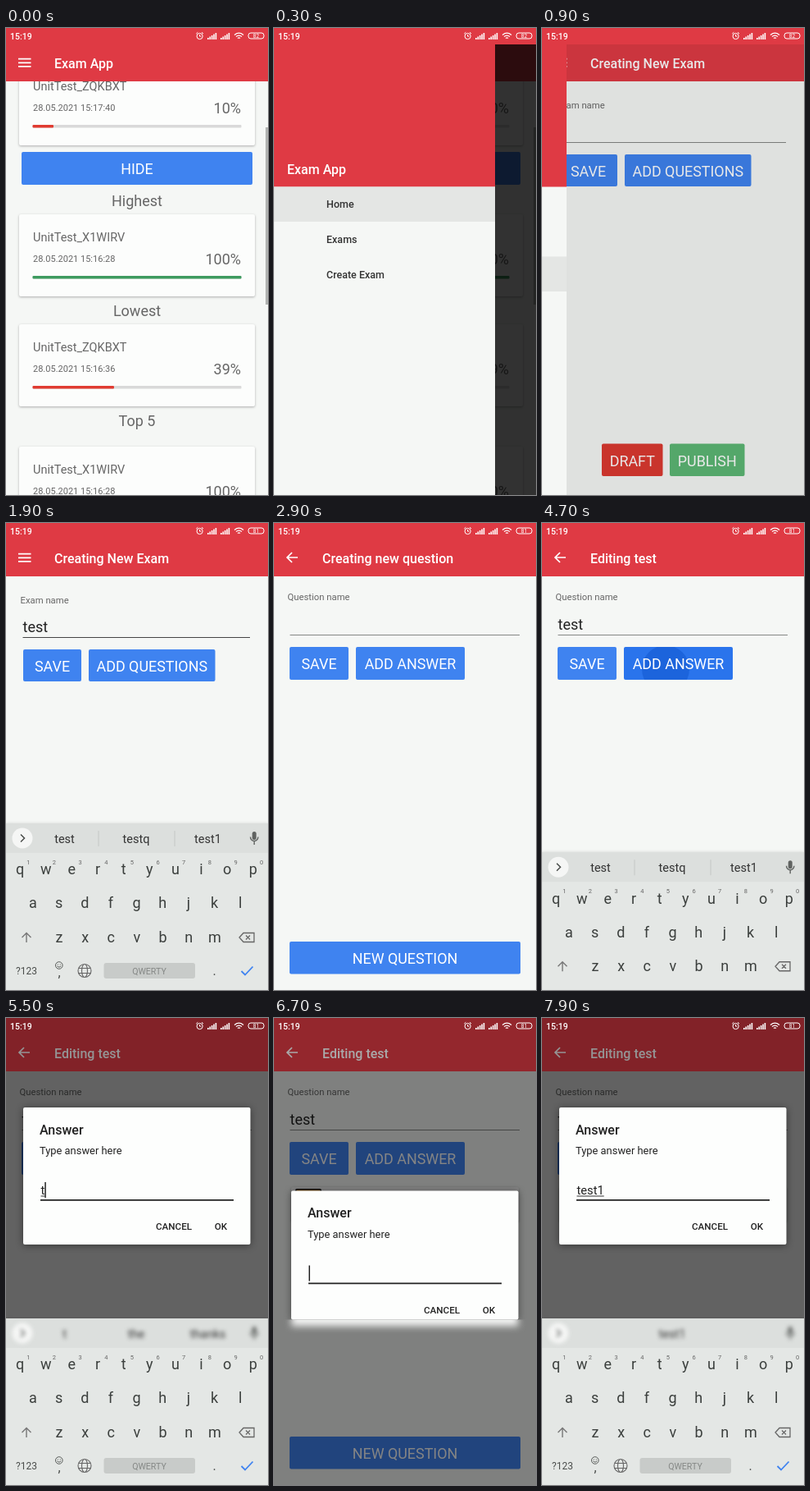
Write an HTML page with a canvas that moves like this. It is 320 px wide and 569 px high and loops after 8000 ms.

```html
<!DOCTYPE html>
<html lang="en">
<head>
<meta charset="utf-8">
<title>Exam App</title>
<style>
  html, body { margin: 0; width: 100%; height: 100%; overflow: hidden; background: #f5f7f5; }
  canvas { display: block; }
</style>
</head>
<body>
<canvas id="stage" width="320" height="569"></canvas>
<script>
const ctx = document.getElementById('stage').getContext('2d');
const W = 320, H = 569, LOOP = 8000;
const RED = '#df3a44', BLUE = '#3f83f0', PRESSED = '#1f6be9', PAPER = '#f5f7f5', GREY = '#666';
const KEYBOARD_SPANS = [[1150, 2000], [3050, 4600], [5000, 6300], [6750, 9000]];
const DIALOG_SPANS = [[4800, 6400], [6600, 9000]];
const HINTS = {
  t: ['t', 'the', 'thanks'], te: ['te', 'the', 'test'], tes: ['tes', 'test', 'yes'],
  test: ['test', 'testq', 'test1'], test1: ['', 'test1', '']
};

const clamp = v => Math.max(0, Math.min(1, v));
const easeOut = p => 1 - (1 - p) ** 2;
const within = (t, a, b) => t >= a && t < b;
const typed = (word, t, start, step = 150) =>
  word.slice(0, Math.max(0, Math.floor((t - start) / step) + 1));

function rect(x, y, w, h, color, radius = 0) {
  ctx.fillStyle = color;
  ctx.beginPath();
  ctx.roundRect(x, y, w, h, radius);
  ctx.fill();
}

function circle(x, y, r, color) {
  ctx.fillStyle = color;
  ctx.beginPath();
  ctx.arc(x, y, r, 0, 7);
  ctx.fill();
}

function stroke(path, color, width = 1) {
  ctx.strokeStyle = color;
  ctx.lineWidth = width;
  ctx.stroke(new Path2D(path));
}

// y is the middle of the capital letters
function text(str, x, y, size, color, align = 'left', weight = 400) {
  ctx.font = `${weight} ${size}px Roboto, sans-serif`;
  ctx.textAlign = align;
  ctx.fillStyle = color;
  ctx.fillText(str, x, y + size * 0.355);
  return ctx.measureText(str).width;
}

function shadowed(draw, blur = 3, alpha = 0.3) {
  ctx.save();
  ctx.shadowColor = `rgba(0,0,0,${alpha})`;
  ctx.shadowBlur = blur;
  ctx.shadowOffsetY = 1;
  draw();
  ctx.restore();
}

function button(label, x, y, w, h, color = BLUE) {
  rect(x, y, w, h, color, 2);
  text(label, x + w / 2, y + h / 2 + 1, 17.9, '#fff', 'center');
}

function statusBar(t) {
  const white = '#fff';
  text('15:19', 5, 10, 10.5, white, 'left', 500);
  stroke('M233 10a3.6 3.6 0 1 0 7.2 0a3.6 3.6 0 1 0-7.2 0M236.6 8v2.2h1.6M232.3 7l2-1.8M241 7l-2-1.8', white);
  for (const x of [246, 262])
    for (let i = 0; i < 5; i++) rect(x + i * 2.4, 12 - i * 1.5, 1.6, 2 + i * 1.5, white);
  stroke('M279 8.5q5.5-4.6 11 0M281 10.6q3.5-2.8 7 0M283 12.4q1.5-1.2 3 0', white, 1.3);
  stroke('M299 6h13a3 3 0 0 1 3 3v1a3 3 0 0 1-3 3h-13a3 3 0 0 1-3-3v-1a3 3 0 0 1 3-3z', white);
  text(t < 1900 ? '82' : '81', 305.5, 9.7, 6.5, white, 'center');
}

function appBar(title, back) {
  rect(0, 0, W, 65, RED);
  stroke(back ? 'M29 42H16.5M22 36l-6 6l6 6' : 'M15 37.7h15.5M15 42.3h15.5M15 46.9h15.5', '#fff', 1.7);
  text(title, 59, 43.5, 16, '#fff', 'left', 500);
}

function resultCard(name, date, percent, y) {
  shadowed(() => rect(16, y, 288, 100, '#fcfdfc', 2));
  text(name, 33, y + 28, 14.5, GREY);
  text(date, 33, y + 54, 11, GREY);
  text(percent + '%', 287, y + 55, 18, GREY, 'right');
  rect(32.5, y + 75, 255, 3.5, '#d9d9d9', 1);
  rect(32.5, y + 75, 2.55 * percent, 3.5, percent < 50 ? '#e03b31' : '#3d9b5f', 1);
}

function resultsPage() {
  resultCard('UnitTest_ZQKBXT', '28.05.2021 15:17:40', 10, 43);
  button('HIDE', 19, 151, 282, 40);
  text('Highest', 160, 211, 18, GREY, 'center');
  resultCard('UnitTest_X1WIRV', '28.05.2021 15:16:28', 100, 227);
  text('Lowest', 160, 345, 18, GREY, 'center');
  resultCard('UnitTest_ZQKBXT', '28.05.2021 15:16:36', 39, 361);
  text('Top 5', 160, 479, 18, GREY, 'center');
  resultCard('UnitTest_X1WIRV', '28.05.2021 15:16:28', 100, 510);
  rect(317, 121, 3, 216, '#b1b3b1');
  appBar('Exam App');
}

function field(label, value, x, labelY, lineY, right, focused, t) {
  text(label, x, labelY, 11.3, GREY);
  const width = text(value, x + 3, lineY - 13, 18, '#222');
  rect(x + 3, lineY - 0.5, right - x - 3, 1, focused ? '#444' : '#858785');
  if (focused && t % 1000 < 800) rect(x + 4 + width, lineY - 23, 1.3, 19, '#222');
}

function examPage(t) {
  appBar(t < 2100 ? 'Creating New Exam' : 'Editing test');
  field('Exam name', typed('test', t, 1400), 17.5, 94, 139.5, 298, within(t, 1150, 2000), t);
  button('SAVE', 21, 154, 71, 39, within(t, 1950, 2150) ? PRESSED : BLUE);
  button('ADD QUESTIONS', 101, 154, 154.5, 39, t >= 2350 ? PRESSED : BLUE);
  button('DRAFT', 73, 506.5, 74.5, 39.5, '#dd3930');
  button('PUBLISH', 156, 506.5, 91.5, 39.5, '#5cb874');
}

function questionPage(t) {
  appBar(t < 4300 ? 'Creating new question' : 'Editing test', true);
  field('Question name', typed('test', t, 3500), 16.5, 90, 136.5, 300, within(t, 3050, 4200), t);
  button('SAVE', 19, 151, 72, 40, within(t, 4150, 4350) ? PRESSED : BLUE);
  const tapped = within(t, 4600, 4900) || within(t, 6500, 6700);
  rect(100, 151, 133, 40, tapped ? '#2a74ec' : BLUE, 2);
  if (tapped) {
    ctx.save();
    ctx.beginPath();
    ctx.rect(100, 151, 133, 40);
    ctx.clip();
    circle(151, 178, 29, '#1c64dc');
    ctx.restore();
  }
  text('ADD ANSWER', 166.5, 172, 17.9, '#fff', 'center');
  if (t >= 6400) {
    shadowed(() => rect(21, 206, 278, 42, '#fcfdfc', 2));
    rect(26, 208, 32, 32, '#222', 2);
    rect(27.5, 209.5, 29, 29, '#f0a030', 1);
    text('test', 68, 226, 14.5, GREY);
  }
  button('NEW QUESTION', 19, 510, 282, 39.5);
}

function drawer(t) {
  const open = t < 700 ? easeOut(clamp(t / 300)) : 1 - easeOut(clamp((t - 700) / 300));
  if (!open) return;
  rect(0, 20, W, H, `rgba(0,0,0,${0.8 * open})`);
  ctx.save();
  ctx.translate(270 * (open - 1), 0);
  rect(0, 0, 270, H, PAPER);
  rect(0, 0, 270, 193.5, RED);
  text('Exam App', 16, 172, 16, '#fff', 'left', 500);
  rect(0, t < 600 ? 193.5 : 278.5, 270, 42.5, '#e4e6e4');
  ['Home', 'Exams', 'Create Exam'].forEach((item, i) =>
    text(item, 64, 215 + i * 42.6, 12.5, '#333', 'left', 500));
  ctx.restore();
}

function dialog(t, keyboard) {
  const span = DIALOG_SPANS.find(([a, b]) => within(t, a, b));
  if (!span) return;
  const shown = easeOut(clamp((t - span[0]) / 180));
  rect(0, 0, W, 65, `rgba(0,0,0,${0.42 * shown})`);
  rect(0, 65, W, H, `rgba(0,0,0,${0.6 * shown})`);
  const value = t < 6500 ? typed('test', t, 5500) : typed('test1', t, 7100);
  const risen = keyboard > 0;
  ctx.save();
  ctx.globalAlpha = clamp(shown * 2);
  ctx.translate(0, 101.5 * (1 - keyboard));
  shadowed(() => rect(21, 109, 277.5, risen ? 167 : 157, '#fdfefd', 2), 10, 0.45);
  if (!risen) {
    ctx.save();
    ctx.beginPath();
    ctx.rect(0, 266, W, 30);
    ctx.clip();
    ctx.filter = 'blur(4px)';
    rect(21, 250, 277.5, 24, '#f4f5f4');
    ctx.restore();
  }
  text('Answer', 41, 136, 16, '#222', 'left', 500);
  text('Type answer here', 41, 161.5, 12.9, '#222');
  const width = text(value, 42.5, 210, 14.7, '#222');
  if (value) rect(42.5, 216.5, width, 1, '#333');
  if (t % 1000 < 800) rect(42.5 + width, 200, 1.5, 19, '#222');
  rect(42, 221, 236, 1.7, '#222');
  text('CANCEL', 205, 254, 11.6, '#222', 'center', 500);
  text('OK', 262.5, 254, 11.6, '#222', 'center', 500);
  ctx.restore();
  return { value };
}

function keyRow(keys, x, y) {
  [...keys].forEach((key, i) => text(key, x + i * 31.65, y, 18, '#3b3f3d', 'center'));
}

function drawKeyboard(amount, word, blurred) {
  if (!amount) return;
  const ink = '#4a4d4b';
  ctx.save();
  ctx.translate(0, H - 203 * amount);
  shadowed(() => rect(0, 0, W, 203, '#e4e7e5'), 4, 0.25);
  rect(0, 0, W, 36, '#dcdfdd');
  ctx.save();
  if (blurred) ctx.filter = 'blur(2.5px)';
  circle(20, 18, 12.5, '#f5f6f5');
  stroke('M18 13.5l4.5 4.5l-4.5 4.5', ink, 1.5);
  (HINTS[word] || []).forEach((hint, i) => text(hint, 71.5 + i * 87.5, 18.5, 14.5, '#333', 'center'));
  if (!blurred) stroke('M113 9v19M206 9v19', '#c4c7c5');
  rect(300.7, 10, 5, 10, '#606361', 2.5);
  stroke('M298.5 16.5a4.7 5 0 0 0 9.4 0M303.2 22v4', '#606361', 1.4);
  ctx.restore();

  keyRow('qwertyuiop', 17, 56);
  [...'1234567890'].forEach((n, i) => text(n, 27.3 + i * 31.65, 47, 7.5, '#666', 'center'));
  keyRow('asdfghjkl', 33, 97);
  keyRow('zxcvbnm', 65, 138.5);
  stroke('M25 145v-11M19.5 139l5.5-5.5l5.5 5.5', '#777', 1.4);
  stroke('M285 139l5-5.5h13v11h-13zM293 136.5l5 5M298 136.5l-5 5', '#666', 1.3);
  text('?123', 25, 180, 12, ink, 'center');
  text(',', 65, 181, 16, ink, 'center');
  stroke('M60.5 173a4.3 4.3 0 1 0 8.6 0a4.3 4.3 0 1 0-8.6 0M62.5 174q2.3 2.5 4.6 0M63.3 171.5v1M66.3 171.5v1', ink, 0.9);
  stroke('M88 179.5a8 8 0 1 0 16 0a8 8 0 1 0-16 0M92.5 179.5a3.5 8 0 1 0 7 0a3.5 8 0 1 0-7 0M89 176.5h14M89 182.5h14', '#666', 1.1);
  rect(119.5, 170, 111.5, 19, '#c8cbc9', 3);
  text('QWERTY', 175, 180, 10.6, '#858886', 'center');
  text('.', 254.5, 179.5, 16, ink, 'center');
  stroke('M287.5 180l4.5 4.5l9.5-10', '#3f83f0', 1.8);
  ctx.restore();
}

function keyboardAmount(t) {
  const span = KEYBOARD_SPANS.find(([a, b]) => within(t, a, b + 240));
  if (!span) return 0;
  return t < span[1]
    ? easeOut(clamp((t - span[0]) / 300))
    : 1 - clamp((t - span[1]) / 240) ** 2;
}

function frame() {
  const t = Math.floor(performance.now() % LOOP / 100) * 100;
  const keyboard = keyboardAmount(t);
  rect(0, 0, W, H, PAPER);
  if (t < 700) resultsPage();
  else if (t < 2500) examPage(t);
  else questionPage(t);
  if (t < 1000) drawer(t);
  const popup = dialog(t, keyboard);
  const word = popup ? popup.value : typed('test', t, t < 2500 ? 1400 : 3500);
  drawKeyboard(keyboard, word, !!popup);
  statusBar(t);
  requestAnimationFrame(frame);
}
frame();
</script>
</body>
</html>
```
